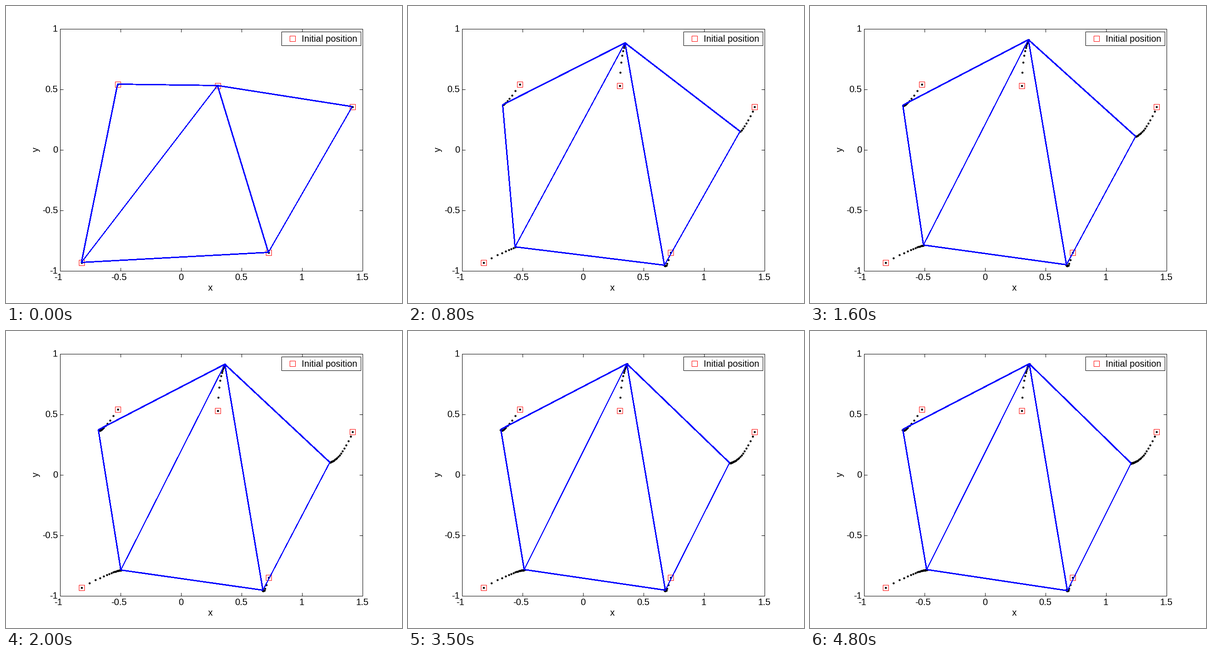
Recreate the animation shown at these times as a matplotlib script. Size 864 px wide and 648 px high, loop 5000 ms.

```python
import numpy as np
import matplotlib.pyplot as plt
from matplotlib.animation import FuncAnimation
from matplotlib.patches import Rectangle

W, H, DPI = 864, 648, 100
FRAMES, INTERVAL = 50, 100
DT, SUBSTEPS = 0.05, 10
LEFT, TOP, RIGHT, BOTTOM = 117, 49, 777, 577
UNIT = 264  # pixels per data unit
PT = 72 / DPI  # points per pixel

START = np.array([(-0.524, 0.541), (0.302, 0.529), (1.415, 0.357),
                  (0.724, -0.849), (-0.822, -0.930)])
SIDE, DIAGONAL = 2 * np.sin(np.pi / 5), 2 * np.sin(2 * np.pi / 5)
# node, node, desired distance, line width in pixels
EDGES = [(0, 1, SIDE, 1.9), (0, 4, SIDE, 1.9), (1, 4, DIAGONAL, 1.1),
         (1, 3, DIAGONAL, 1.9), (1, 2, SIDE, 1.9), (2, 3, SIDE, 1.1),
         (3, 4, SIDE, 1.9)]


def velocity(pos):
    """Gradient descent on the squared-distance errors of all edges."""
    vel = np.zeros_like(pos)
    for i, j, dist, _ in EDGES:
        gap = pos[i] - pos[j]
        push = (gap @ gap - dist ** 2) * gap
        vel[i] -= push
        vel[j] += push
    return vel


def rk4(pos, h):
    a = velocity(pos)
    b = velocity(pos + h / 2 * a)
    c = velocity(pos + h / 2 * b)
    d = velocity(pos + h * c)
    return pos + h / 6 * (a + 2 * b + 2 * c + d)


def simulate():
    path = [START]
    for _ in range(FRAMES - 1):
        pos = path[-1]
        for _ in range(SUBSTEPS):
            pos = rk4(pos, DT / SUBSTEPS)
        path.append(pos)
    return np.array(path)


def to_pixels(pos):
    x = LEFT + UNIT * (pos[..., 0] + 1)
    y = TOP + UNIT * (1 - pos[..., 1])
    return np.round(np.stack([x, y], axis=-1)) + 0.5


path = to_pixels(simulate())

fig = plt.figure(figsize=(W / DPI, H / DPI), dpi=DPI, facecolor="white")
ax = fig.add_axes([0, 0, 1, 1])
ax.set_xlim(0, W)
ax.set_ylim(H, 0)
ax.axis("off")


def segment(x0, y0, x1, y1):
    ax.plot([x0 + 0.5, x1 + 0.5], [y0 + 0.5, y1 + 0.5], color="black",
            lw=PT, solid_capstyle="butt", zorder=1)


def box(x0, y0, x1, y1, zorder):
    ax.add_patch(Rectangle((x0 + 0.5, y0 + 0.5), x1 - x0, y1 - y0, fc="white",
                           ec="black", lw=PT, joinstyle="miter",
                           zorder=zorder))


def label(x, y, text, ha="center", va="baseline", **kw):
    ax.text(x, y, text, ha=ha, va=va, family="Liberation Sans",
            fontsize=20 * PT, zorder=8, **kw)


def squares(x, y, zorder):
    ax.plot(x, y, "s", ms=12 * PT, mfc="none", mec="red", mew=PT,
            zorder=zorder)


box(LEFT, TOP, RIGHT, BOTTOM, 0)
for k in range(6):
    value = -1 + k / 2
    x = LEFT + UNIT * k // 2
    if 0 < k < 5:
        segment(x, TOP, x, TOP + 7)
        segment(x, BOTTOM - 7, x, BOTTOM)
    label(x + 0.5 - (3.5 if value < 0 else 0), 598, f"{value:g}")
    if k < 5:
        y = BOTTOM - UNIT * k // 2
        if 0 < k < 4:
            segment(LEFT, y, LEFT + 7, y)
            segment(RIGHT - 7, y, RIGHT, y)
        label(113, y + 7, f"{value:g}", ha="right")
label(446, 621, "x")
label(65.5, 313.5, "y", va="center", rotation=90)

box(600, 55, 773, 85, 6)
squares([624.5], [70.5], 7)
label(645, 78, "Initial position", ha="left")

squares(path[0, :, 0], path[0, :, 1], 2)
trail, = ax.plot([], [], "o", ms=4.4 * PT, color="black", mew=0, zorder=3)
bars = [ax.plot([], [], color="blue", lw=width * PT, antialiased=False,
                solid_capstyle="butt", zorder=4)[0]
        for *_, width in EDGES]


def draw(frame):
    dots = path[:frame + 1].reshape(-1, 2)
    trail.set_data(dots[:, 0], dots[:, 1])
    for bar, (i, j, *_) in zip(bars, EDGES):
        ends = path[frame, [i, j]]
        bar.set_data(ends[:, 0], ends[:, 1])
    return [trail, *bars]


anim = FuncAnimation(fig, draw, frames=FRAMES, interval=INTERVAL,
                     init_func=lambda: draw(0), repeat=True, repeat_delay=0,
                     blit=False)
plt.show()
```
